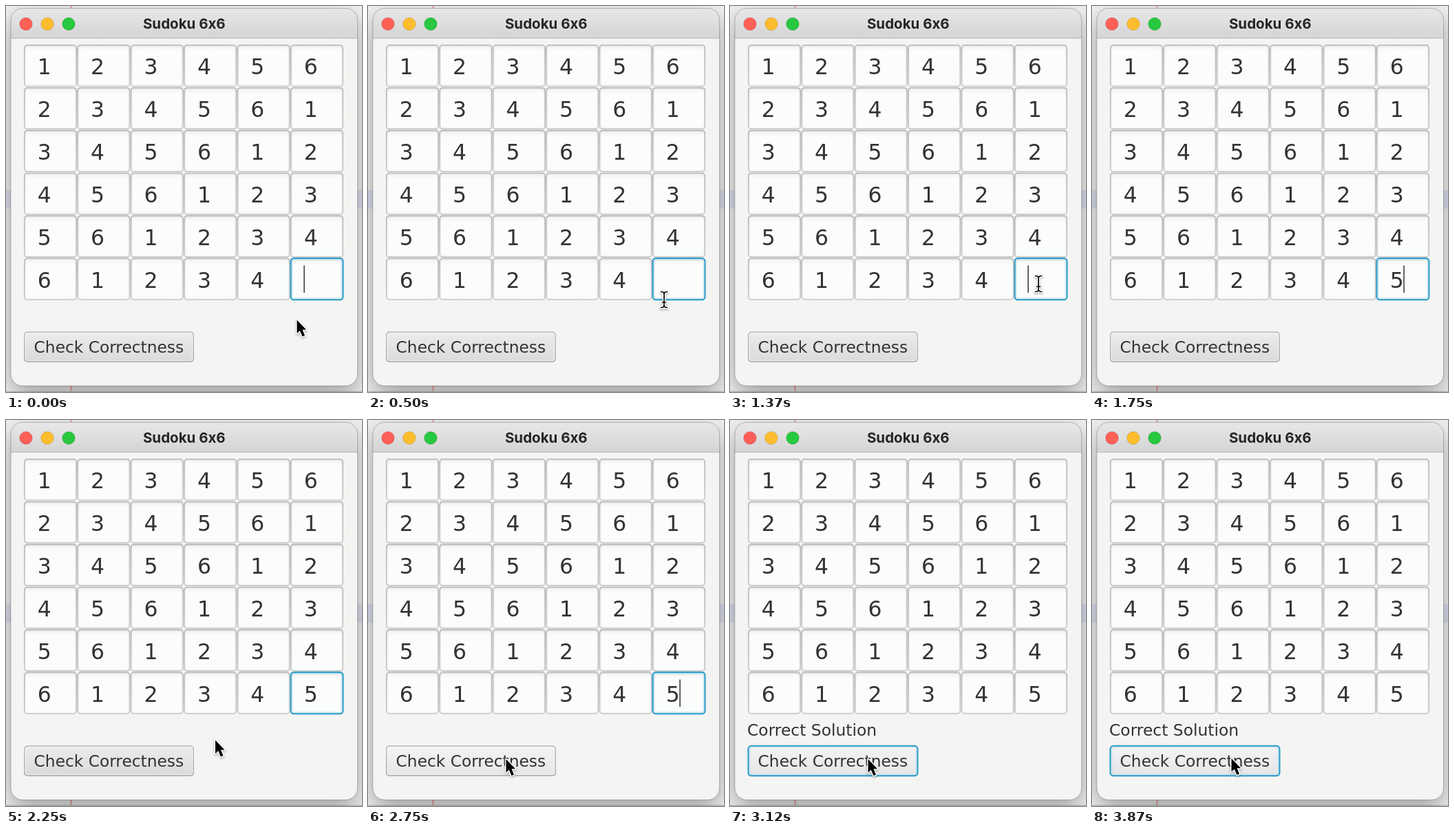
Animation of 517 by 560 pixels, one loop 4 s. Source, as an HTML page with a canvas:

```html
<!DOCTYPE html>
<html lang="en">
<head>
<meta charset="utf-8">
<title>Sudoku 6x6</title>
<style>
html, body { margin: 0; width: 100%; height: 100%; overflow: hidden; }
canvas { display: block; width: 517px; height: 560px; }
</style>
</head>
<body>
<canvas id="stage" width="517" height="560"></canvas>
<script>
const ctx = document.getElementById('stage').getContext('2d');
const LOOP = 4000;
const SANS = '"DejaVu Sans", Verdana, sans-serif';
const INK = '#333333';
const FOCUS = '#2a9fcd';
const CELL = { x: 26, y: 56, dx: 77.4, dy: 61.9, w: 77, h: 61.3 };
const BUTTON = [26, 472.3, 247, 44.4];

// [start in ms, cursor kind, x, y]
const CURSOR = [
  [0, 'arrow', 421, 453],
  [120, 'arrow', 421, 452],
  [250, 'arrow', 421, 448],
  [370, 'arrow', 423, 439],
  [500, 'beam', 430, 426],
  [620, 'beam', 444, 407],
  [750, 'beam', 447, 404],
  [870, 'beam', 448, 403],
  [1750, 'none', 448, 403],
  [2250, 'arrow', 302.5, 462],
  [2370, 'arrow', 255, 477],
  [2500, 'arrow', 220, 488],
  [2620, 'arrow', 203, 490],
  [2750, 'arrow', 199, 489.5],
  [3750, 'arrow', 200, 489],
  [3870, 'arrow', 201, 488.5]
];
// Caret visibility over time
const CARET = [[0, true], [250, false], [750, true], [1250, false], [1370, true], [2250, false], [2750, true]];
const TYPED = 1750, HOVERED = 2370, PRESSED = 2870, RELEASED = 3000;

const at = (track, t) => track.filter(step => step[0] <= t).pop();

function gradient(y0, y1, ...colors) {
  const g = ctx.createLinearGradient(0, y0, 0, y1);
  colors.forEach((c, i) => g.addColorStop(i / (colors.length - 1), c));
  return g;
}

function rounded(x, y, w, h, r) {
  ctx.beginPath();
  ctx.roundRect(x, y, w, h, r);
}

function fillRounded(x, y, w, h, r, color) {
  rounded(x, y, w, h, r);
  ctx.fillStyle = color;
  ctx.fill();
}

function strokeRounded(x, y, w, h, r, color, width) {
  rounded(x, y, w, h, r);
  ctx.strokeStyle = color;
  ctx.lineWidth = width;
  ctx.stroke();
}

function text(str, x, y, size) {
  ctx.font = `${size}px ${SANS}`;
  ctx.textAlign = 'left';
  ctx.fillStyle = INK;
  ctx.fillText(str, x, y);
}

function focusRing(x, y, w, h) {
  strokeRounded(x + 2.6, y + 2.6, w - 5.2, h - 5.2, 3, 'rgba(3,158,211,.13)', 2.4);
  strokeRounded(x + .5, y + .5, w - 1, h - 1, 4.5, FOCUS, 2);
}

function drawBackdrop() {
  ctx.fillStyle = '#f4f4f5';
  ctx.fillRect(0, 0, 517, 560);
  ctx.fillStyle = '#dfe3f1';
  ctx.fillRect(0, 267, 517, 27);
  ctx.fillStyle = '#f2a3a0';
  ctx.fillRect(93.5, 0, 2, 560);
  ctx.fillStyle = '#c9c9c9';
  ctx.fillRect(0, 558.5, 517, 1.5);
}

function drawWindow() {
  ctx.save();
  ctx.shadowColor = 'rgba(0,0,0,.38)';
  ctx.shadowBlur = 36;
  ctx.shadowOffsetY = 12;
  fillRounded(7, 3.5, 503.5, 547.5, 17, '#f4f4f2');
  ctx.restore();

  ctx.save();
  rounded(7, 3.5, 503.5, 547.5, 17);
  ctx.clip();
  ctx.fillStyle = gradient(3, 47, '#e9e8e8', '#d5d4d4');
  ctx.fillRect(7, 3, 504, 43.5);
  ctx.fillStyle = '#bfbfbf';
  ctx.fillRect(7, 46, 504, 1.3);
  ctx.restore();
  strokeRounded(7, 3.5, 503.5, 547.5, 17, 'rgba(0,0,0,.24)', 1);

  ['#fe5f57', '#fdbd2e', '#28c840'].forEach((color, i) => {
    ctx.beginPath();
    ctx.arc(29 + i * 31, 26, 9.3, 0, Math.PI * 2);
    ctx.fillStyle = color;
    ctx.fill();
    ctx.strokeStyle = 'rgba(0,0,0,.12)';
    ctx.lineWidth = 1;
    ctx.stroke();
  });

  ctx.font = '700 20.5px Inter, sans-serif';
  ctx.textAlign = 'center';
  ctx.fillStyle = '#252525';
  ctx.fillText('Sudoku 6x6', 258.8, 33);
}

function drawCell(col, row, digit, focused) {
  const x = CELL.x + col * CELL.dx, y = CELL.y + row * CELL.dy;
  const { w, h } = CELL;
  fillRounded(x, y, w, h, 5, gradient(y, y + h, '#b5b5b5', '#c6c6c6'));
  fillRounded(x + 1.6, y + 1.6, w - 3.2, h - 3.2, 3.5, gradient(y, y + 9, '#eeefef', '#fbfdfc'));
  strokeRounded(x + 2.4, y + 2.4, w - 4.8, h - 4.8, 3, 'rgba(0,0,0,.025)', 2);
  if (focused) focusRing(x, y, w, h);
  if (digit) text(digit, x + 19.7, y + 43, 31.4);
}

function drawGrid(t) {
  for (let row = 0; row < 6; row++) {
    for (let col = 0; col < 6; col++) {
      const last = row === 5 && col === 5;
      const digit = last && t < TYPED ? '' : String((row + col) % 6 + 1);
      drawCell(col, row, digit, last && t < PRESSED);
    }
  }
  if (t < PRESSED && at(CARET, t)[1]) {
    ctx.fillStyle = INK;
    ctx.fillRect(t < TYPED ? 432.3 : 452.3, 376.5, 1.5, 39.5);
  }
}

function drawButton(t) {
  const [x, y, w, h] = BUTTON;
  const pressed = t >= PRESSED && t < RELEASED;
  const face = pressed ? ['#cfcfd1', '#d8d8da']
    : t >= HOVERED ? ['#f4f4f5', '#e5e5e8'] : ['#ececee', '#dadadc'];
  fillRounded(x, y, w, h, 5, gradient(y, y + h, '#bebebe', '#adadad'));
  fillRounded(x + 1.6, y + 1.6, w - 3.2, h - 3.2, 4, pressed ? face[0] : '#f8f8f9');
  fillRounded(x + 2.8, y + 3, w - 5.6, h - 5.4, 3, gradient(y, y + h, ...face));
  if (t >= PRESSED) focusRing(x, y, w, h);
  text('Check Correctness', 40.6, 503, 23.3);
}

function outlined(fillWidth, trace) {
  ctx.save();
  ctx.lineJoin = ctx.lineCap = 'round';
  ctx.shadowColor = 'rgba(0,0,0,.3)';
  ctx.shadowBlur = 3;
  ctx.shadowOffsetY = 1.5;
  ctx.beginPath();
  trace();
  ctx.strokeStyle = '#fff';
  ctx.lineWidth = fillWidth + 3;
  ctx.stroke();
  ctx.shadowColor = 'transparent';
  ctx.strokeStyle = ctx.fillStyle = '#000';
  if (fillWidth) {
    ctx.lineWidth = fillWidth;
    ctx.stroke();
  } else {
    ctx.fill();
  }
  ctx.restore();
}

function drawCursor([, kind, x, y]) {
  ctx.save();
  ctx.translate(x, y);
  if (kind === 'arrow') {
    outlined(0, () => {
      const points = [[1.5, 2.5], [1.5, 22], [5.8, 18], [9.4, 26.5], [13, 25], [9.5, 16.7], [15, 16.5]];
      points.forEach(p => ctx.lineTo(...p));
      ctx.closePath();
    });
  } else if (kind === 'beam') {
    outlined(1.7, () => {
      for (const s of [-1, 1]) {
        ctx.moveTo(-4.5, 11.5 * s);
        ctx.quadraticCurveTo(0, 11.5 * s, 0, 8 * s);
        ctx.quadraticCurveTo(0, 11.5 * s, 4.5, 11.5 * s);
      }
      ctx.moveTo(0, -9);
      ctx.lineTo(0, 9);
      ctx.moveTo(-2.5, 4);
      ctx.lineTo(2.5, 4);
    });
  }
  ctx.restore();
}

function render(now) {
  const t = now % LOOP;
  drawBackdrop();
  drawWindow();
  drawGrid(t);
  if (t >= RELEASED) text('Correct Solution', 25, 458, 23.4);
  drawButton(t);
  drawCursor(at(CURSOR, t));
}

const start = performance.now();
function tick() {
  render(performance.now() - start);
  requestAnimationFrame(tick);
}
tick();
</script>
</body>
</html>
```
